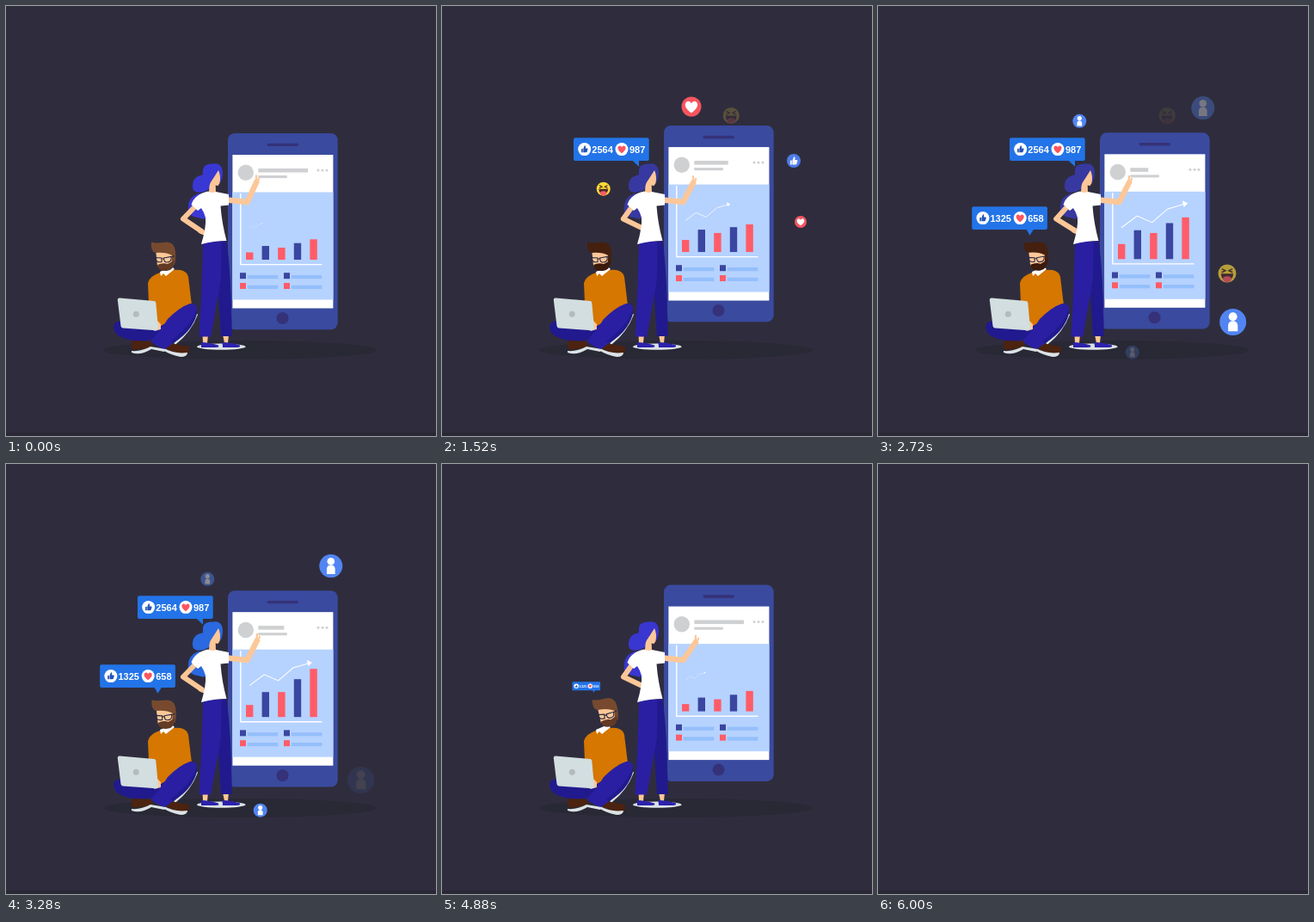
These frames come from a looping animation (500x500 px, 6.04 s). An HTML page:

```html
<!DOCTYPE html>
<html lang="en">
<head>
<meta charset="utf-8">
<title>Social analytics</title>
<style>
  html, body { margin: 0; width: 100%; height: 100%; overflow: hidden; background: #2f2d3d; }
  svg { display: block; width: 100%; height: 100%; }
  text { font: bold 11px "Liberation Sans", Arial, sans-serif; fill: #fff; }
</style>
</head>
<body>
<svg viewBox="0 0 500 500">
  <defs>
    <g id="thumb">
      <path d="M-.52-.05h.24v.6h-.24zM-.2-.05L.02-.58Q.24-.6.2-.3L.15-.12H.48Q.6-.08.54.06L.42.46Q.38.56.26.56H-.2z"/>
    </g>
    <path id="heart" d="M0 .62C-.95 0-.62-.55-.3-.55Q-.08-.55 0-.32Q.08-.55.3-.55C.62-.55.95 0 0 .62z"/>
    <g id="like"><circle r="1" fill="#4f80f0"/><use href="#thumb" fill="#fff"/></g>
    <g id="love"><circle r="1" fill="#f4555f"/><use href="#heart" fill="#fff"/></g>
    <g id="laugh">
      <circle r="1" fill="#fed93a"/>
      <path d="M-.6-.52L-.2-.32L-.6-.12M.6-.52L.2-.32L.6-.12" fill="none" stroke="#4b3420" stroke-width=".14"/>
      <path d="M-.68.02H.68Q.64.76 0 .78Q-.64.76-.68.02z" fill="#4b2a2a"/>
      <path d="M-.44.42Q0 .2.44.42V.7Q.36.98 0 .98T-.44.7z" fill="#ff5a68"/>
    </g>
    <g id="user">
      <circle r="1" fill="#5285f2"/>
      <circle cy="-.4" r=".32" fill="#fff"/>
      <path d="M-.36.7V.24Q-.32-.08 0-.08T.36.24V.7z" fill="#fff"/>
    </g>
  </defs>

  <rect width="500" height="500" fill="#2f2d3d"/>
  <rect y="496" width="500" height="4" fill="#2a2837"/>

  <g id="scene">
    <ellipse cx="272" cy="400" rx="159" ry="11" fill="#292835"/>

    <g id="phone">
      <rect x="258" width="127.7" height="228.3" rx="8" fill="#3a4a9f"/>
      <rect x="303.5" y="11.7" width="36.5" height="3.4" rx="1.7" fill="#353279"/>
      <circle cx="321.5" cy="215" r="7" fill="#353279"/>
      <rect x="263.4" y="25" width="117" height="178.5" fill="#fff"/>
      <rect x="263.4" y="68.5" width="117" height="125" fill="#b6d2ff"/>
      <g fill="#cfd0d2">
        <circle cx="278.8" cy="45.7" r="9.2"/>
        <rect id="title" x="293.3" y="40.9" height="4.6"/>
        <rect x="293.3" y="49" width="33.5" height="3.1"/>
        <circle cx="363" cy="43" r="1.5"/><circle cx="368" cy="43" r="1.5"/><circle cx="373" cy="43" r="1.5"/>
      </g>
      <path d="M272.8 70V152.6H367.5" fill="none" stroke="#fff" stroke-width="1.4"/>
      <g id="bars"></g>
      <g id="trend">
        <path d="M0 0L18-13.5L35-6L53-21.5L72-27" fill="none" stroke="#fff" stroke-width="1.1"/>
        <path d="M69.5-31L76-28L71.5-23.5z" fill="#fff"/>
      </g>
      <g id="legend"></g>
    </g>

    <g id="woman">
      <ellipse cx="250.3" cy="396.2" rx="28.3" ry="3.6" fill="#dbe2e5"/>
      <g fill="#fcc798">
        <path d="M228.5 382H235L234 392H229zM252 382H259L258 392H254z"/>
      </g>
      <path d="M227 391Q236 391 247 394.5Q248.500 397 244 397H227zM251.500 391Q262 391 272 394.500Q273 397 268 397H252z" fill="#2c22ad"/>
      <path d="M243 274L256.500 273Q262 312 262.500 384H250Z" fill="#211a8e"/>
      <path d="M229 274H250.500L250 318L238 384.500H224.500Q228 325 229 274z" fill="#2a1fa3"/>
      <path d="M250 310L252.500 384H262.500Q262 330 258 290z" fill="#211a8e"/>
      <g class="hair">
        <path d="M224 218Q212 222 212 234Q210 244 223 246Q232 249 235 246L237 220z"/>
        <path d="M230 196Q216 198 217 211Q218 219 230 216Q239 214 242 202z"/>
      </g>
      <path id="backArm" fill="none" stroke="#fcc798" stroke-width="6" stroke-linejoin="round"/>
      <path id="hand" fill="none" stroke="#fcc798" stroke-width="5" stroke-linecap="round"/>
      <path d="M237 203H243.500L244 217Q239 219 236 216z" fill="#fcc798"/>
      <path d="M238 193Q247 186 249.500 192Q251 205 246.500 209Q240 209 238 200z" fill="#fcc798"/>
      <path class="hair" d="M229 190Q230 183 241 183.500Q251 182 252 193Q252 202 248.500 206Q250 197 247 191Q242 199 238 205Q234 216 227 216Q229 201 229 190z"/>
      <path id="pointArm" fill="none" stroke="#fcc798" stroke-width="6.500" stroke-linejoin="round"/>
      <path id="finger" fill="none" stroke="#fcc798" stroke-width="2.300" stroke-linecap="round"/>
      <path d="M215.500 231Q219 219 235 215.500Q240 218 244 216L259 219V231.500L249.500 232.500Q251 253 256.500 273Q242 273 227 277Q233 257 232 246Q230 239 227 235L223 238z" fill="#fff"/>
    </g>

    <g id="man">
      <path d="M222 358Q214 379 196 393" fill="none" stroke="#dbe2e5" stroke-width="2.500"/>
      <path d="M147 389L170 390L169 397L150 400Q143 398 147 389z" fill="#4b2310"/>
      <path d="M146 401Q157 402 168 396L186 399L184 402L169 399Q156 407 146 403z" fill="#dbe2e5"/>
      <path d="M190 392L213 396Q214 405 208 406L186 399z" fill="#4b2310"/>
      <path d="M184 398Q196 405 211 403Q211 408 203 408Q192 406 182 400z" fill="#dbe2e5"/>
      <path d="M125 372Q126 365 139 366L192 367L185 382L166 389Q141 391 129 382Q125 378 125 372z" fill="#211a8e"/>
      <path d="M166 345L165 322Q167 314 179 310Q191 306 203 307Q211 309 212 315L216 348L191 366L180 372L166 362z" fill="#d57700"/>
      <path d="M179 309L193 303L196 306L186 314L183 311L180 314z" fill="#fff"/>
      <path d="M176 366L180 370V376L172 378z" fill="#fcc798"/>
      <path d="M168 390Q180 377 188 364Q202 350 214 346Q224 345 222 356Q217 374 206 383L185 399Q177 397 168 390z" fill="#2a1fa3"/>
      <path d="M222 353Q215 372 190 391L196 391Q217 377 222 358z" fill="#211a8e"/>
      <path d="M132 339.500L172 343Q174 343 174.300 345L177 375Q177 377.500 174.500 377.300L136 374.500Q133.800 374.300 133.500 372L129.800 342Q129.600 339.500 132 339.500z" fill="#d3dee0"/>
      <circle cx="151.300" cy="358.300" r="3.500" fill="#b3bbbf"/>
      <g id="head">
        <path d="M174 283H194V301Q184 308 176 302z" fill="#fcc798"/>
        <path class="brown" d="M169 274.500Q175 276 182 275Q193 273 196 281Q198.500 290 196 301L192.500 300L193 290Q186 286 174 287Q168 286 169 274.500z"/>
        <path class="beard" d="M176 301Q182 298 188 300L195.500 296Q196 307 187 308Q177 309 176 301z"/>
        <path d="M173.500 292.500L181 293V297.500Q174 299 173.500 292.500zM183.500 293L192 291.500Q193 298 187 298Q183.500 298 183.500 293zM181 294H183.500M192 292L196 290.500" fill="none" stroke="#2b2940" stroke-width="1.100"/>
      </g>
    </g>

    <g id="tips"></g>
    <g id="pops"></g>
  </g>
</svg>
<script>
const LOOP = 6040;
const $ = id => document.getElementById(id);
const set = (el, attrs) => { for (const k in attrs) el.setAttribute(k, attrs[k]); };
const clamp = v => Math.max(0, Math.min(1, v));
const ease = v => (1 - Math.cos(Math.PI * clamp(v))) / 2;
const mix = (a, b, k) => a + (b - a) * k;

// keys: [[time, value], ...]
function track(t, keys, curve = v => v) {
  const i = keys.findIndex(k => k[0] > t);
  if (i === 0) return keys[0][1];
  if (i < 0) return keys[keys.length - 1][1];
  const [t0, a] = keys[i - 1], [t1, b] = keys[i];
  return mix(a, b, curve((t - t0) / (t1 - t0)));
}
const step = (t, keys) => keys.filter(k => k[0] <= t).pop()[1];

const NAVY = '#3a46a0', RED = '#ff5c68';
const BASE = [8.5, 16, 14, 19.3, 23.7];
const BAR_KEYS = [
  [900, BASE],
  [2240, [20.5, 37.5, 31.5, 40, 42]],
  [3280, [14, 29, 29, 44, 56]],
  [3920, [9, 19, 20, 31, 43]],
  [4700, BASE]
];
$('bars').innerHTML = BASE.map((_, i) =>
  `<rect x="${279 + i * 18.6}" width="8.4" fill="${i % 2 ? NAVY : RED}"/>`).join('');
const bars = [...$('bars').children];

$('legend').innerHTML = [272, 323].map(x => [162.2, 174].map((y, row) =>
  `<rect x="${x}" y="${y}" width="7" height="7" fill="${row ? RED : NAVY}"/>
   <rect x="${x + 8.8}" y="${y + 2.8}" width="35.5" height="4.2" fill="#94bffb"/>`).join('')).join('');

const TIPS = [
  { x: 153, y: 153.2, tip: 76, tail: [68, 76], likes: 2564, loves: 987, show: [380, 700], hide: [3480, 3800] },
  { x: 109.2, y: 233.2, tip: 67.3, tail: [63, 72], likes: 1325, loves: 658, show: [1580, 1900], hide: [4680, 5000] }
];
$('tips').innerHTML = TIPS.map(p => `<g>
  <path d="M${p.tail[0]} 26L${p.tip} 33.5L${p.tail[1]} 26z" fill="#2374e8"/>
  <rect width="87.700" height="26.700" rx="2" fill="#2374e8"/>
  <circle cx="12.700" cy="13.400" r="7.500" fill="#fff"/>
  <use href="#thumb" transform="translate(12.700 13.200) scale(7)" fill="#2352b4"/>
  <text x="21.300" y="17.400">${p.likes}</text>
  <circle cx="56" cy="13.400" r="7.500" fill="#fff"/>
  <use href="#heart" transform="translate(56 13.400) scale(7.300)" fill="#fb5560"/>
  <text x="65" y="17.400">${p.loves}</text>
</g>`).join('');
const tips = [...$('tips').children];

// kind, x, y, radius, start, end
const POPS = [
  ['love', 290, 117, 11.5, 715, 1900],
  ['love', 417, 251, 7, 1030, 2328],
  ['laugh', 187.700, 212.700, 8, 1115, 2415],
  ['like', 409, 180, 8, 1185, 2485],
  ['laugh', 336.200, 127.400, 9.500, 1450, 2750],
  ['laugh', 406, 311, 10.500, 1650, 2950],
  ['user', 412.700, 367.500, 15.500, 2100, 3315],
  ['user', 234.300, 133.800, 8, 2270, 3438],
  ['user', 377.800, 118.600, 13.500, 2600, 3900],
  ['user', 295.700, 402.700, 8, 2640, 3930]
];
$('pops').innerHTML = POPS.map(([kind, x, y, r]) =>
  `<use href="#${kind}" transform="translate(${x} ${y}) scale(${r})"/>`).join('');
const pops = [...$('pops').children];

function drawPhone(t) {
  const p = t % 3000;
  const lift = p < 1450 ? ease(p / 1450) : 1 - ease((p - 1450) / 1550);
  set($('phone'), { transform: `translate(0 ${148 - 9 * lift})` });
  set($('title'), {
    width: track(t, [[760, 57.7], [1500, 40], [2240, 21], [2600, 19], [3280, 30], [3920, 49.500], [4600, 57.700]])
  });
  bars.forEach((bar, i) => {
    const h = track(t, BAR_KEYS.map(([time, v]) => [time, v[i]]));
    set(bar, { y: 147 - h, height: h });
  });
  const s = track(t, [[0, .2], [760, .31], [1500, .68], [2240, 1], [2700, 1.02], [3280, .96], [3920, .69], [4880, .31], [5640, .2]]);
  set($('trend'), { transform: `translate(283 110.500) scale(${s})` });
}

function drawPeople(t) {
  const p = t % 3000;
  const bend = ease((p - 1000) / 600) - ease((p - 2350) / 550);
  const ex = mix(206, 211, bend), hx = mix(229, 236, bend), hy = mix(263, 259.500, bend);
  set($('backArm'), { d: `M${mix(221, 222, bend)} 232L${ex} 247.500L${hx} ${hy}` });
  set($('hand'), { d: `M${hx - 3} ${hy - 1}L${hx + 1.500} ${hy + 1}` });

  const reach = track(t, [[0, 0], [760, .3], [3280, .2], [3920, .7], [4880, 1], [5900, 0]]);
  const px = 292 + 4 * reach, py = 203 + 2.500 * reach;
  set($('pointArm'), { d: `M257 225.500L280.500 228L${px} ${py}` });
  set($('finger'), { d: `M${px - 1} ${py}L${px - 1} ${py - 5.500}M${px + 1} ${py + .500}L${px + 2} ${py - 2.500}` });

  const turn = track(t, [[1400, 0], [2240, .22], [3200, .05], [3900, 1], [4900, 1], [5700, 0]], ease);
  set($('head'), { transform: `translate(${8.500 * turn} ${-2.500 * turn}) rotate(${-7 * turn} 186 300)` });

  const hair = step(t, [[0, '#3a38d4'], [400, '#3739a0'], [2760, '#2a69e0'], [3600, '#3573dc'], [4400, '#3a36d0']]);
  document.querySelectorAll('.hair').forEach(el => set(el, { fill: hair }));
  const dark = t > 1500 && t < 2760;
  set(document.querySelector('.brown'), { fill: dark ? '#45200f' : '#774a2f' });
  set(document.querySelector('.beard'), { fill: dark ? '#3c1a0c' : '#633a24' });
}

function drawOverlays(t) {
  TIPS.forEach((tip, i) => {
    const s = clamp((t - tip.show[0]) / (tip.show[1] - tip.show[0]))
            - clamp((t - tip.hide[0]) / (tip.hide[1] - tip.hide[0]));
    set(tips[i], {
      transform: `translate(${tip.x + tip.tip * (1 - s)} ${tip.y + 32 * (1 - s)}) scale(${s})`,
      visibility: s > 0 ? 'visible' : 'hidden'
    });
  });
  POPS.forEach(([, , , , start, end], i) =>
    set(pops[i], { opacity: clamp(Math.min(t - start, end - t) / 350) }));
}

function render(t) {
  set($('scene'), { visibility: t < 6000 ? 'visible' : 'hidden' });
  if (t >= 6000) {
    tips.forEach(el => set(el, { visibility: 'hidden' }));
    return;
  }
  drawPhone(t);
  drawPeople(t);
  drawOverlays(t);
}

const begin = performance.now();
function frame() {
  render((performance.now() - begin) % LOOP);
  requestAnimationFrame(frame);
}
frame();
</script>
</body>
</html>
```
